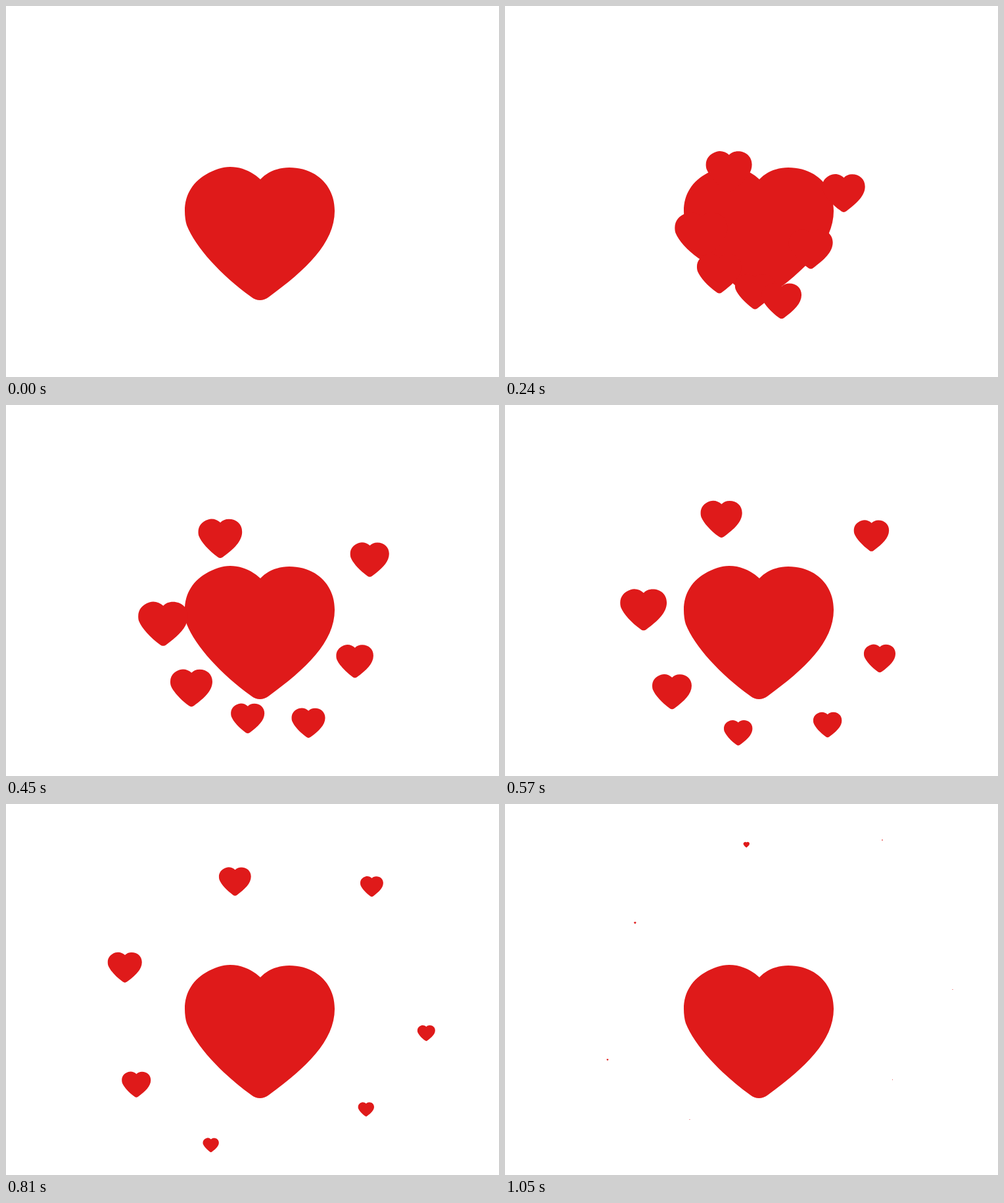
An HTML page for the animation above (1080 ms loop, 750 by 565 pixels).

```html
<!DOCTYPE html>
<html lang="en">
<head>
<meta charset="utf-8">
<title>Heart burst</title>
<style>
  html, body { margin: 0; height: 100%; overflow: hidden; background: #fff; }
  svg { display: block; }
</style>
</head>
<body>
<svg id="stage" width="750" height="565" fill="#df1a1a">
  <path id="heart" d="M387 264 C374 252 358 245 341 245 C335 245 329 246 323 248
    C290 259 272 282 272 312 C272 320 273 328 275 334 C288 367 327 410 373 443
    C381 449.5 391 450 400 443 C456 402 500 361 500 312 C500 272 470 246 431 246
    C413 246 397 253 387 264 Z"/>
</svg>
<script>
const SVG = 'http://www.w3.org/2000/svg';
const LOOP = 1080, STEP = 30, TRAVEL = 1050;
const CENTER = '-386 -346.5', WIDTH = 228;
const stage = document.getElementById('stage');

// Each heart follows its route at constant speed; lag delays its shrinking.
const hearts = [
  { route: 'M381 295 C278 214 347 147 367.3 62', size: 71, lag: 3.2, gone: 1080 },
  { route: 'M445 305 C627 283 519 153 574 55', size: 67, lag: .93 },
  { route: 'M368 338 C245 386 137 281 197.8 181', size: 81.5, lag: 2.6 },
  { route: 'M364 365 C310 450 203 462 156 389.5', size: 69, lag: 2.6 },
  { route: 'M379 384 C398 471 320 582 281 480.5', size: 65, lag: -.28 },
  { route: 'M409 389 C409 532 546 498 589.5 420', size: 65, lag: -.28 },
  { route: 'M415 310 C475 442 649 396 681 282.5', size: 72, lag: -.28 }
].map(({ route, size, lag, gone = 1060 }) => {
  const path = document.createElementNS(SVG, 'path');
  path.setAttribute('d', route);
  const shape = document.createElementNS(SVG, 'use');
  shape.setAttribute('href', '#heart');
  stage.append(shape);
  return { path, length: path.getTotalLength(), shape, size, lag, gone };
});

const shrink = (u, lag) => u * u / (1 + lag * (1 - u));

function draw(now) {
  const t = Math.floor(now % LOOP / STEP) * STEP;
  for (const { path, length, shape, size, lag, gone } of hearts) {
    const { x, y } = path.getPointAtLength(length * t / TRAVEL);
    const scale = size / WIDTH * (1 - shrink(t / gone, lag));
    shape.setAttribute('transform',
      `translate(${x} ${y}) scale(${scale}) translate(${CENTER})`);
    shape.style.display = t < 2 * STEP ? 'none' : '';
  }
}

const start = performance.now();
function tick() {
  draw(performance.now() - start);
  requestAnimationFrame(tick);
}
tick();
</script>
</body>
</html>
```
